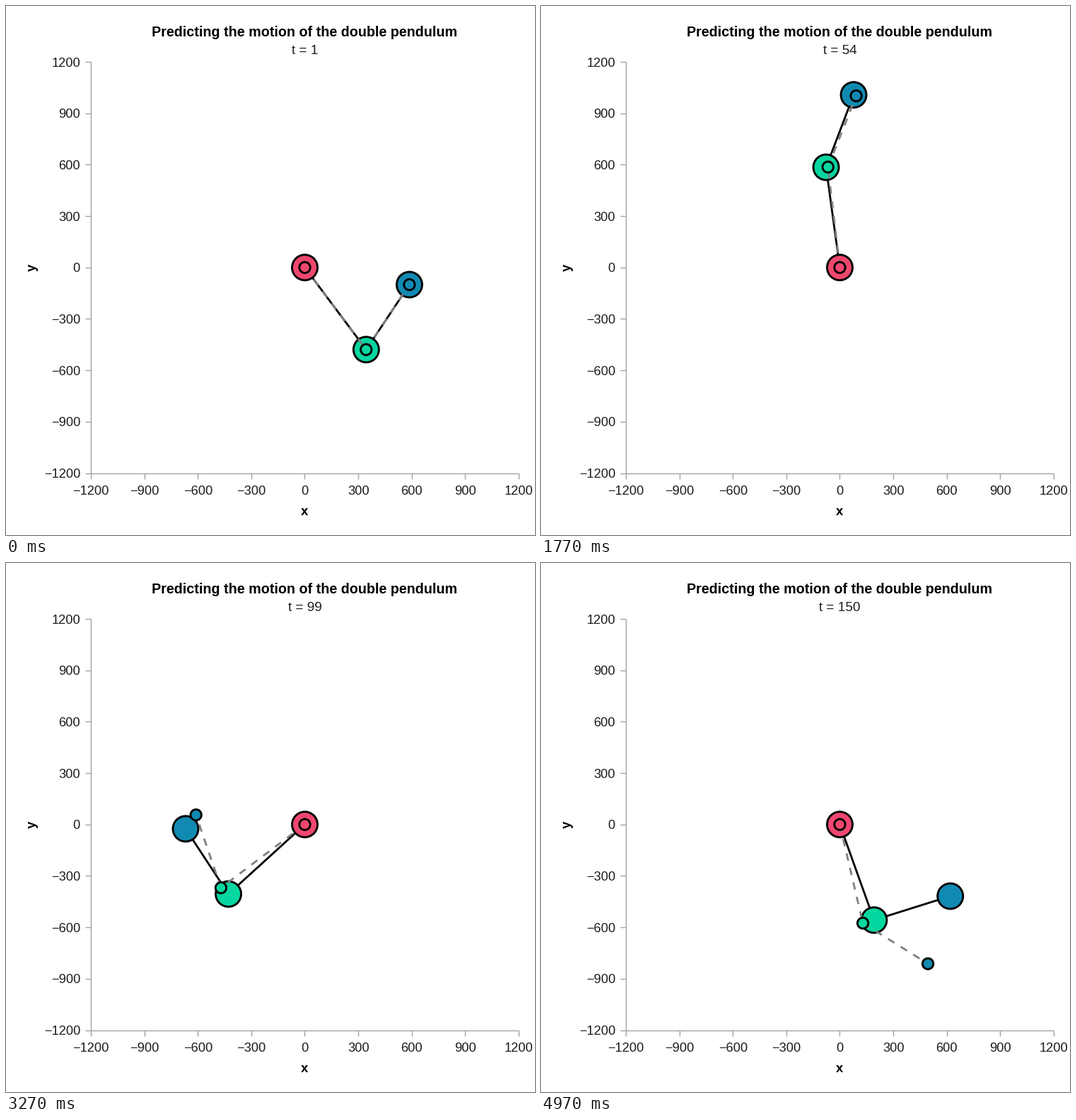
Write a matplotlib script that moves like this. It is 748 by 748 pixels and loops after 5 s.

```python
import numpy as np
import matplotlib.pyplot as plt
from matplotlib.animation import FuncAnimation
from matplotlib.patches import Circle

SIZE, DPI = 748, 64
PX = 72 / DPI                     # points per pixel
LOOP, TICK = 5000, 20             # ms per loop, ms per redraw
STEPS = 150                       # pendulum positions per loop
LIMIT = 1200
LEFT, RIGHT, TOP, BOTTOM = 120, 725, 79, 660.5
CX, CY = (LEFT + RIGHT) / 2, (TOP + BOTTOM) / 2
SX, SY = (RIGHT - LEFT) / (2 * LIMIT), (BOTTOM - TOP) / (2 * LIMIT)
ARM1, ARM2 = 590, 450
COLORS = ("#ef476f", "#06d6a0", "#118ab2")
AXIS, INK = "#a3a3a3", "#1c1c1c"
FONT = "Liberation Sans"


def spline(x, y, t):
    """Not-a-knot cubic spline through (x, y), evaluated at t."""
    x, y = np.array(x, float), np.array(y, float)
    h, n = np.diff(x), len(x)
    slope = np.diff(y) / h
    A, rhs = np.zeros((n, n)), np.zeros(n)
    A[0, :3] = h[1], -(h[0] + h[1]), h[0]
    A[-1, -3:] = h[-1], -(h[-2] + h[-1]), h[-2]
    for i in range(1, n - 1):
        A[i, i - 1:i + 2] = h[i - 1], 2 * (h[i - 1] + h[i]), h[i]
        rhs[i] = 6 * (slope[i] - slope[i - 1])
    m = np.linalg.solve(A, rhs)
    i = np.clip(np.searchsorted(x, t, "right") - 1, 0, n - 2)
    a = (x[i + 1] - t) / h[i]
    b = 1 - a
    bend = ((a**3 - a) * m[i] + (b**3 - b) * m[i + 1]) * h[i]**2 / 6
    return a * y[i] + b * y[i + 1] + bend


def rise(t, mid, width):
    return 1 / (1 + np.exp(-(t - mid) / width))


def bump(t, mid, width):
    return np.exp(-((t - mid) / width)**2)


def joints(a1, a2, l1, l2):
    """Pixel positions of pivot, elbow and tip; angles in degrees from straight down."""
    a1, a2 = np.radians(a1), np.radians(a2)
    x1, y1 = l1 * np.sin(a1), -l1 * np.cos(a1)
    x2, y2 = x1 + l2 * np.sin(a2), y1 - l2 * np.cos(a2)
    zero = np.zeros_like(x1)
    xs, ys = np.array([zero, x1, x2]), np.array([zero, y1, y2])
    return CX + SX * xs, CY - SY * ys


# Measured pendulum: a smooth swing through a few poses
t = np.arange(STEPS)
marks = [0, 23, 38, 53, 70, 86, 109, 130, 149]
upper = spline(marks, [35.7, 93.5, 137.8, 187.5, 240.8, 285.4, 333.1, 355.6, 379], t)
lower = spline(marks, [147.4, 211.6, 208.4, 159.9, 134, 166.4, 263.5, 372.8, 468.1], t)
real = joints(upper, lower, ARM1, ARM2)

# Predicted pendulum: falls behind gradually and briefly overstretches
lag1 = 6.4 * rise(t, 76, 14) - 3 * bump(t, 130, 9)
lag2 = 55 * rise(t, 113, 14)
stretch = bump(t, 109, 10)
guess = joints(upper - lag1, lower - lag2,
               ARM1 + 27 * stretch, ARM2 - 0.1 * t + 25 * stretch)

fig = plt.figure(figsize=(SIZE / DPI, SIZE / DPI), dpi=DPI, facecolor="white")
ax = fig.add_axes([0, 0, 1, 1])
ax.set_xlim(0, SIZE)
ax.set_ylim(SIZE, 0)
ax.axis("off")


def label(x, y, text, size, ha="center", **kw):
    kw.setdefault("va", "baseline")
    return ax.text(x, y, text, fontsize=size * PX, ha=ha, family=FONT, **kw)


def rule(xs, ys):
    ax.plot(xs, ys, color=AXIS, lw=1.4 * PX, solid_capstyle="butt")


rule([LEFT, LEFT], [TOP, BOTTOM])
rule([LEFT, RIGHT], [BOTTOM, BOTTOM])
for v in range(-LIMIT, LIMIT + 1, 300):
    text = str(v).replace("-", "\u2212")
    x, y = CX + SX * v, CY - SY * v
    rule([x, x], [BOTTOM, BOTTOM + 8])
    rule([LEFT - 8, LEFT], [y, y])
    label(x, 691, text, 18.2, color=INK)
    label(105, y + 6.5, text, 18.2, ha="right", color=INK)

label(CX, 43, "Predicting the motion of the double pendulum", 19.75, weight="bold")
label(CX, 720, "x", 18.5, weight="bold")
label(37, CY, "y", 18.5, weight="bold", rotation=90, va="center")
clock = label(CX, 67.5, "", 19, color=INK)


class Pendulum:
    def __init__(self, path, radius, z, **line):
        self.xs, self.ys = path
        self.arms = [ax.plot([], [], lw=2.8 * PX, zorder=z, solid_capstyle="butt",
                             dash_capstyle="butt", **line)[0] for _ in range(2)]
        self.bobs = [ax.add_patch(Circle((CX, CY), radius, fc=c, ec="black",
                                         lw=2.9 * PX, zorder=z + 1)) for c in COLORS]

    def pose(self, n):
        x, y = self.xs[:, n], self.ys[:, n]
        for k, arm in enumerate(self.arms):
            arm.set_data(x[k:k + 2], y[k:k + 2])
        for bob, px, py in zip(self.bobs, x, y):
            bob.center = px, py


pendulums = [
    Pendulum(real, 18, 3, color="black"),
    Pendulum(guess, 7.7, 5, color="#7f7f7f", linestyle=(0, (3.75, 3.75))),
]


def draw(k):
    # Steps start on the nearest 10 ms, hence the 5 ms lead
    ms = k * TICK + TICK / 2 + 5
    n = min(int(ms * STEPS / LOOP), STEPS - 1)
    clock.set_text(f"t = {n + 1}")
    for p in pendulums:
        p.pose(n)
    return []


anim = FuncAnimation(fig, draw, frames=LOOP // TICK, interval=TICK,
                     repeat=True, repeat_delay=0, blit=False)
plt.show()
```
